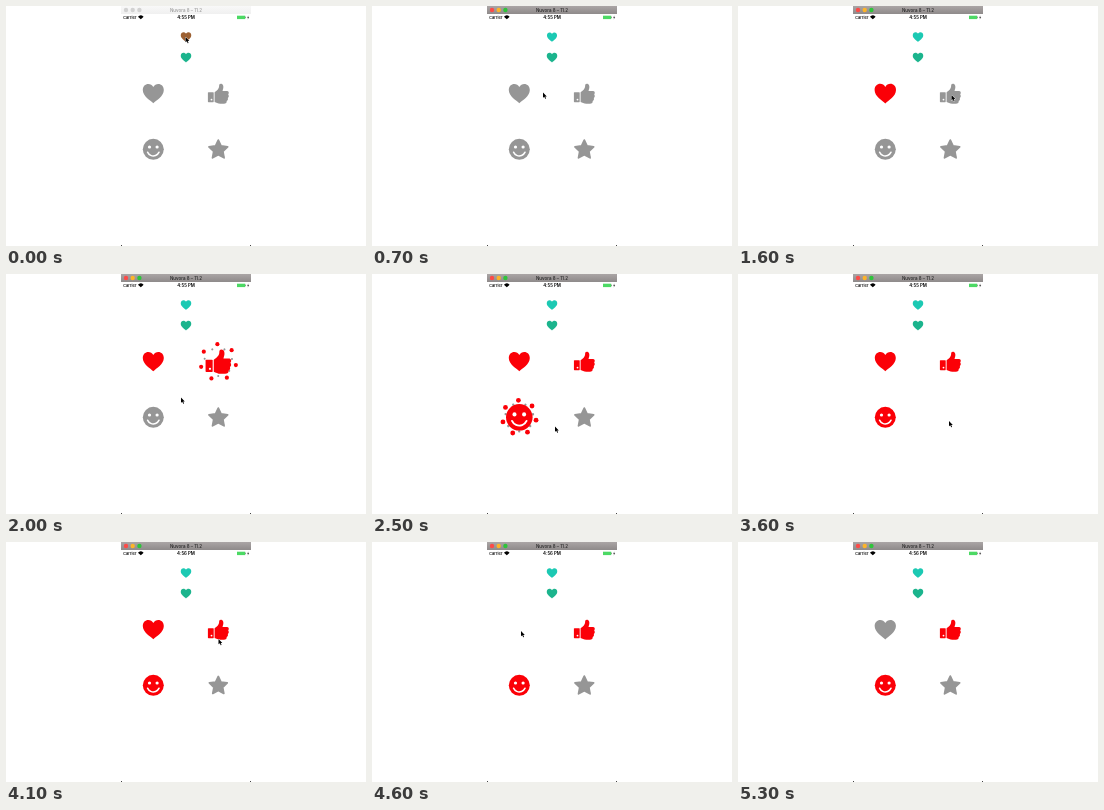
Animation of 360 by 240 pixels, one loop 5.5 s. Source, as an HTML page with a canvas:

```html
<!DOCTYPE html>
<html lang="en">
<head>
<meta charset="utf-8">
<style>
html, body { margin: 0; width: 100%; height: 100%; overflow: hidden; background: #fff; }
canvas { display: block; width: 360px; height: 240px; }
</style>
</head>
<body>
<canvas></canvas>
<script>
const canvas = document.querySelector('canvas');
const ctx = canvas.getContext('2d');
const ratio = window.devicePixelRatio || 1;
canvas.width = 360 * ratio;
canvas.height = 240 * ratio;

const LOOP = 5500, STEP = 100, LAST = 5300;
const GRAY = '#969696', RED = '#fb0007';
const EXPAND = 0.13, COLLAPSE = 0.115, ICON_DELAY = 0.184;

const heart = new Path2D('M0 10C-3 7-10.5 3-10.5-3.3C-10.5-7-8-9.3-5-9.3C-3-9.3-1-8.2 0-6.3C1-8.2 3-9.3 5-9.3C8-9.3 10.5-7 10.5-3.3C10.5 3 3 7 0 10Z');
const cuff = new Path2D('M-9.8-1.8H-5.2Q-4.6-1.8-4.6-1.2V7.6Q-4.6 8.2-5.2 8.2H-9.8Q-10.4 8.2-10.4 7.6V-1.2Q-10.4-1.8-9.8-1.8Z');
const hand = new Path2D('M-3.7-1.8C-1.5-3 .8-5.5.8-7.5C.8-9.5 1.3-10.2 2.5-10.2C4.8-10.2 5.3-7.8 5-6L4.2-2.9H8.5C10.7-2.9 11-.8 9.9.6C10.9 2 10.6 3.4 9.5 4C10 5.3 9.5 6.6 8.4 7C8.6 8.8 7.5 9.7 5.6 9.7H2C-.5 9.7-2 8.7-3.7 8Z');
const arrow = new Path2D('M0 0V5.3L1.3 4.2L2.2 6.3L3.1 5.9L2.2 3.9H3.8Z');

const clamp = v => Math.min(1, Math.max(0, v));
const mix = (a, b, k) => a + (b - a) * k;
const easeOut = k => 1 - (1 - k) ** 2;
const elastic = s => 1 - 2 ** (-10 * s) * Math.cos(2 * Math.PI * s / 0.39);
const polar = (r, deg) => [r * Math.sin(deg * Math.PI / 180), -r * Math.cos(deg * Math.PI / 180)];

function disc(x, y, r, color) {
  ctx.fillStyle = color;
  ctx.beginPath();
  ctx.arc(x, y, r, 0, 2 * Math.PI);
  ctx.fill();
}

function text(str, x, y, font, color, align = 'center') {
  ctx.font = font;
  ctx.fillStyle = color;
  ctx.textAlign = align;
  ctx.textBaseline = 'middle';
  ctx.fillText(str, x, y);
}

const shapes = {
  heart() { ctx.fill(heart); },
  thumb(color) {
    ctx.fill(cuff);
    ctx.fill(hand);
    disc(-6.8, 5.6, 0.9, '#fff');
  },
  smiley(color) {
    disc(0, 0, 10.5, color);
    disc(-3.8, -2.3, 1.6, '#fff');
    disc(3.8, -2.3, 1.6, '#fff');
    ctx.strokeStyle = '#fff';
    ctx.lineWidth = 1.5;
    ctx.lineCap = 'round';
    ctx.beginPath();
    ctx.arc(0, 0.3, 6.3, 0.42, Math.PI - 0.42);
    ctx.stroke();
  },
  star(color) {
    ctx.beginPath();
    for (let i = 0; i < 10; i++) {
      const [x, y] = polar(i % 2 ? 4.8 : 9.8, i * 36);
      ctx.lineTo(x, y + 0.7);
    }
    ctx.closePath();
    ctx.lineWidth = 1.8;
    ctx.lineJoin = 'round';
    ctx.strokeStyle = color;
    ctx.fill();
    ctx.stroke();
  }
};

// taps alternate between selecting and deselecting
const buttons = [
  { shape: 'heart', x: 180, y: 31, scale: 0.5, off: '#9c6032', on: '#1cc9b3', taps: [80] },
  { shape: 'heart', x: 180, y: 51.5, scale: 0.5, off: '#1bb48d', on: RED, taps: [] },
  { shape: 'heart', x: 147.3, y: 87.3, scale: 1, off: GRAY, on: RED, taps: [850, 4600] },
  { shape: 'thumb', x: 212.3, y: 88, scale: 1, off: GRAY, on: RED, taps: [1605] },
  { shape: 'smiley', x: 147.3, y: 143.3, scale: 1, off: GRAY, on: RED, taps: [2166] },
  { shape: 'star', x: 212.3, y: 143.2, scale: 1, off: GRAY, on: RED, taps: [2866, 3600] }
];

function ring(age) {
  if (age > EXPAND + COLLAPSE) return;
  const outer = 15.2 * easeOut(clamp(age / EXPAND));
  const inner = 15.2 * easeOut(clamp((age - EXPAND) / COLLAPSE)) * 0.9;
  const k = clamp(age / EXPAND);
  ctx.strokeStyle = `rgb(${mix(220, 240, k)},${mix(60, 120, k)},${mix(50, 30, k)})`;
  ctx.lineWidth = outer - inner;
  ctx.beginPath();
  ctx.arc(0, 0, (outer + inner) / 2, 0, 2 * Math.PI);
  ctx.stroke();
}

function sparks(age) {
  const show = clamp((age - 0.234) / 0.1);
  const size = 1 - clamp((age - 0.36) / 0.26);
  if (age < 0.2 || !size) return;
  const drift = 1.6 * easeOut(clamp((age - 0.334) / 0.2));
  ctx.lineCap = 'round';
  for (let i = 0; i < 7; i++) {
    const angle = i * 360 / 7;
    if (show) {
      const [x, y] = polar(mix(12, 17, show) + drift, angle - 3);
      disc(x, y, 2.4 * show * size, RED);
    }
    const r = mix(9.6, 14, show), half = mix(1.3, 0.01, show);
    ctx.strokeStyle = show < 0.5 ? '#5c5c78' : GRAY;
    ctx.lineWidth = mix(0.8, 2.4, show) * size;
    ctx.beginPath();
    ctx.moveTo(...polar(r - half, angle + 26));
    ctx.lineTo(...polar(r + half, angle + 26));
    ctx.stroke();
  }
}

function drawButton(b, t) {
  const past = b.taps.filter(tap => tap <= t);
  const selected = past.length % 2 === 1;
  const age = past.length ? (t - past[past.length - 1]) / 1000 : Infinity;
  const size = age > 1.2 ? 1 : age > ICON_DELAY ? elastic(age - ICON_DELAY) : 0;
  const color = selected ? b.on : b.off;
  ctx.save();
  ctx.translate(b.x, b.y);
  ctx.scale(b.scale, b.scale);
  if (selected) {
    ring(age);
    sparks(age);
  }
  ctx.scale(size, size);
  ctx.fillStyle = color;
  if (size > 0) shapes[b.shape](color);
  ctx.restore();
}

function drawWindow(t) {
  const active = t >= 200;
  const bar = ctx.createLinearGradient(0, 0, 0, 8);
  bar.addColorStop(0, active ? '#aaa5a5' : '#f8f8f8');
  bar.addColorStop(1, active ? '#8e8a8a' : '#f0f0f0');
  ctx.fillStyle = bar;
  ctx.fillRect(115, 0, 130, 8);
  const lights = active ? ['#fc4b48', '#fdb429', '#2fc43b'] : Array(3).fill('#d2d2d2');
  lights.forEach((color, i) => disc(120 + i * 6.7, 4, 2.2, color));
  text('Nuvora 8 – 11.2', 180, 4.2, '500 4.5px Inter, sans-serif', active ? '#222' : '#999');

  text('Carrier', 117, 11.5, '500 4.1px Inter, sans-serif', '#000', 'left');
  ctx.fillStyle = '#000';
  ctx.beginPath();
  ctx.moveTo(134.8, 13.3);
  ctx.arc(134.8, 13.3, 3.8, -Math.PI * 0.77, -Math.PI * 0.23);
  ctx.fill();
  text(t < 3900 ? '4:55 PM' : '4:56 PM', 180, 11.5, '600 4.4px Inter, sans-serif', '#000');
  ctx.fillStyle = '#4cd964';
  ctx.fillRect(231, 9.7, 8.2, 3.4);
  ctx.fillStyle = '#444';
  ctx.fillRect(239.5, 10.7, 0.5, 1.4);
  ctx.beginPath();
  ctx.moveTo(242.5, 9.5);
  ctx.lineTo(241, 11.7);
  ctx.lineTo(242, 11.7);
  ctx.lineTo(241.7, 13.4);
  ctx.lineTo(243.2, 11);
  ctx.lineTo(242.2, 11);
  ctx.fill();

  ctx.fillStyle = '#444';
  ctx.fillRect(115, 239, 1, 1);
  ctx.fillRect(244, 239, 1, 1);
}

// time, x, y
const route = [
  [0, 179.5, 31], [200, 179.5, 31], [700, 171, 86.5], [850, 149, 88], [1100, 149, 88],
  [1600, 213.5, 89], [1800, 213.5, 89], [2150, 150, 146], [2250, 150, 146], [2500, 183, 152.5],
  [2800, 211, 147], [3600, 211, 147], [4100, 212.5, 97], [4500, 149, 89], [5100, 149, 89]
];

function drawCursor(t) {
  const next = route.findIndex(p => p[0] > t);
  if (next < 0) return;
  const [a, b] = [route[next - 1], route[next]];
  const k = (t - a[0]) / (b[0] - a[0]);
  const eased = k * k * (3 - 2 * k);
  ctx.save();
  ctx.translate(mix(a[1], b[1], eased), mix(a[2], b[2], eased));
  ctx.strokeStyle = '#fff';
  ctx.lineWidth = 0.8;
  ctx.stroke(arrow);
  ctx.fillStyle = '#000';
  ctx.fill(arrow);
  ctx.restore();
}

function draw(now) {
  const t = Math.min(LAST, Math.floor(now % LOOP / STEP) * STEP);
  ctx.setTransform(ratio, 0, 0, ratio, 0, 0);
  ctx.fillStyle = '#fff';
  ctx.fillRect(0, 0, 360, 240);
  drawWindow(t);
  buttons.forEach(b => drawButton(b, t));
  drawCursor(t);
}

const start = performance.now();
function tick() {
  draw(performance.now() - start);
  requestAnimationFrame(tick);
}
tick();
</script>
</body>
</html>
```
